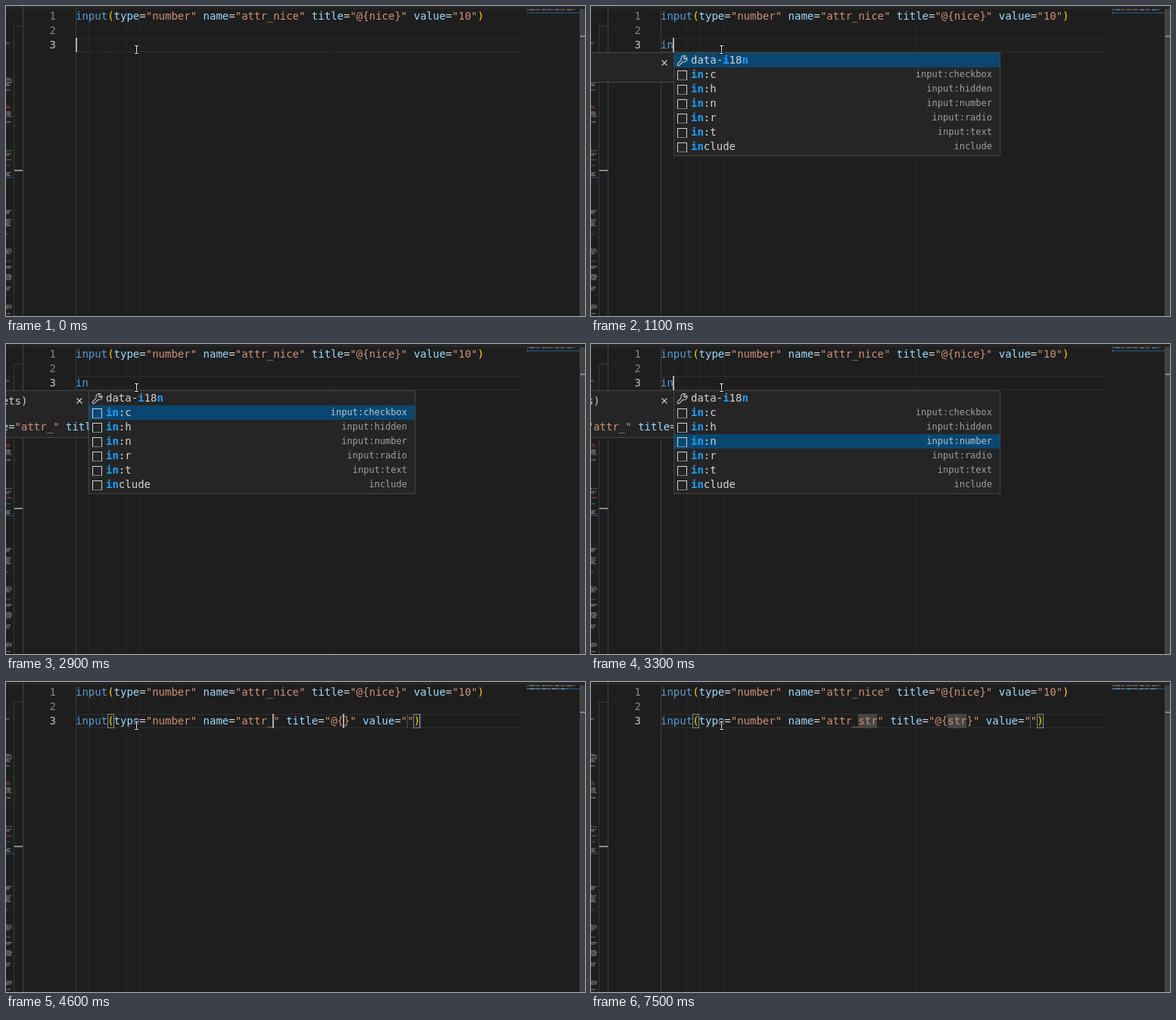
Animation, 765 px wide and 409 px high, one loop 8 s. Source, as an HTML page with a canvas:

```html
<!DOCTYPE html>
<html lang="en">
<head>
<meta charset="utf-8">
<title>Editor completion</title>
<style>
  html, body { margin: 0; width: 100%; height: 100%; overflow: hidden; background: #1e1e1e; }
  canvas { display: block; }
</style>
</head>
<body>
<canvas id="stage" width="765" height="409"></canvas>
<script>
const ctx = document.getElementById('stage').getContext('2d');
const LOOP = 8000, LEFT = 92, ROW = 19, CH = 14 * 0.60205;
const MONO = '"DejaVu Sans Mono", monospace';
const COLOR = {
  bg: '#1e1e1e', text: '#d4d4d4', tag: '#569cd6', attr: '#9cdcfe',
  string: '#ce9178', paren: '#ffd700', match: '#18a3ff',
  panel: '#252526', edge: '#454545', selected: '#094771'
};

const tagLine = (type, name = '', value = '') =>
  `input(type="${type}" name="attr_${name}" title="@{${name}}" value="${value}")`;
const FIRST = tagLine('number', 'nice', '10');

// Timelines: [start, value]
const TYPED = [[0, ''], [500, 'i'], [1100, 'in']];
const NAMES = [[4500, ''], [6000, 's'], [6200, 'st'], [6400, 'str']];
const SELECTED = [[500, 0], [2900, 1], [3100, 2], [3300, 3], [3900, 4],
  [4000, 5], [4100, 6], [4200, 5], [4300, 4], [4400, 3]];
const BLINKS = [200, 500, 900, 1100, 1600, 2100, 2600, 3100, 3600, 4100,
  5000, 5500, 6900, 7000, 7500];
const ACCEPT = 4500, BRACKETS = 4600, NEXT_STOP = 7000;

const ITEMS = [
  ['data-i18n', ''],
  ['in:c', 'input:checkbox'], ['in:h', 'input:hidden'], ['in:n', 'input:number'],
  ['in:r', 'input:radio'], ['in:t', 'input:text'], ['include', 'include']
];
const SHORT_ITEMS = [ITEMS[0], ['if', 'if'], ...ITEMS.slice(1)];

// Rows of the neighbouring overview: y, line count, colour
const OVERVIEW = [
  [48, 1], [95, 2], [100, 3], [110, 1], [132, 2, '#a65a3a'], [139, 4], [152, 1],
  [190, 1], [194, 2], [202, 1, '#a65a3a'], [210, 1, '#3f78a8'], [219, 3],
  [269, 3], [281, 5], [300, 1], [320, 4], [336, 1], [343, 2], [354, 4],
  [370, 3], [394, 3], [405, 1]
];

const at = (line, t) => line.reduce((v, [start, next]) => t >= start ? next : v, line[0][1]);
const colX = col => LEFT + col * CH;

function box(x, y, w, h, color) {
  ctx.fillStyle = color;
  ctx.fillRect(x, y, w, h);
}

function frame(x, y, w, h, color) {
  ctx.strokeStyle = color;
  ctx.lineWidth = 1;
  ctx.strokeRect(x + 0.5, y + 0.5, w - 1, h - 1);
}

function text(str, x, y, color, size = 14, weight = '', align = 'left') {
  ctx.font = `${weight} ${size}px ${MONO}`;
  ctx.textAlign = align;
  ctx.fillStyle = color;
  ctx.fillText(str, x, y);
}

function tokens(str) {
  return [...str.matchAll(/^\w+|[()]|\w+(?==)|=|"[^"]*"/g)].map(m => {
    const s = m[0];
    const color = m.index === 0 ? COLOR.tag : s[0] === '"' ? COLOR.string :
      s === '=' ? COLOR.text : /[()]/.test(s) ? COLOR.paren : COLOR.attr;
    return { s, col: m.index, color };
  });
}

function code(str, x, y) {
  for (const k of tokens(str)) text(k.s, x + k.col * CH, y, k.color);
}

function miniCode(str, y) {
  ctx.globalAlpha = 0.5;
  for (const k of tokens(str)) {
    for (let i = 0; i < k.s.length; i++) {
      if (k.s[i] !== '"') box(688 + k.col + i, y + (i % 3 === 1 ? 0.5 : 0), 1, 1.5, k.color);
    }
  }
  ctx.globalAlpha = 1;
}

function leftOverview() {
  let seed = 7;
  const random = () => (seed = seed * 16807 % 2147483647) / 2147483647;
  for (const [y, count, color = '#9a9a9a'] of OVERVIEW) {
    for (let i = 0; i < count; i++) {
      const end = 3 + random() * 5;
      for (let x = 0; x < end; x++) {
        ctx.globalAlpha = 0.25 + random() * 0.55;
        box(x, y + i * 2, 1, 1.5, color);
      }
    }
  }
  ctx.globalAlpha = 1;
  box(0, 226, 10, 1, '#264f78');
  box(10, 26, 1, 383, '#383838');
  box(10, 26, 12, 1, '#383838');
  box(11, 216, 11, 2, '#8a8a8a');
  box(22, 0, 1, 409, '#444444');
}

function background() {
  box(0, 0, 765, 409, COLOR.bg);
  box(0, 0, 765, 4, COLOR.panel);
  leftOverview();
  for (const col of [2, 4, 6, 8, 10, 40]) box(Math.round(colX(col)), 4, 1, 405, '#262626');
  box(LEFT, 4, 1, 405, '#3c3c3c');
  box(LEFT, 42, 588, 1.5, '#2a2a2a');
  box(LEFT, 59.5, 588, 1.5, '#2a2a2a');
  for (let n = 1; n <= 3; n++) {
    text(n, 66, ROW * n - 1, n === 3 ? '#c6c6c6' : '#858585', 14, '', 'right');
  }
  box(758, 4, 7, 405, '#424242');
  box(758, 4, 1, 405, '#4a4a4a');
  box(759, 39, 6, 2, '#8a8a8a');
  box(688, 8, 70, 2, '#22405f');
}

function wrench(x, y) {
  ctx.strokeStyle = '#c5c5c5';
  ctx.lineWidth = 1.1;
  ctx.lineJoin = 'round';
  ctx.beginPath();
  ctx.moveTo(x + 11.5, y + 1);
  ctx.bezierCurveTo(x + 7, y - 0.5, x + 4.5, y + 3, x + 5.8, y + 6.2);
  ctx.lineTo(x + 1, y + 11);
  ctx.bezierCurveTo(x - 0.2, y + 12.8, x + 1.6, y + 14.4, x + 3.3, y + 13.2);
  ctx.lineTo(x + 8, y + 8.5);
  ctx.bezierCurveTo(x + 12, y + 9.7, x + 14.4, y + 6.5, x + 13.2, y + 3);
  ctx.lineTo(x + 10.6, y + 5.5);
  ctx.lineTo(x + 8.8, y + 3.7);
  ctx.closePath();
  ctx.stroke();
}

function snippetIcon(x, y) {
  const c = '#d0d0d0';
  box(x, y, 13, 1, c);
  box(x, y, 1, 13, c);
  box(x + 12, y, 1, 13, c);
  for (let i = 2; i < 12; i += 2) box(x + i, y + 12, 1, 1, c);
}

function details(item, edge) {
  const [label, detail] = item;
  const height = detail ? 63 : 40;
  box(0, 61, edge + 1, height, COLOR.panel);
  frame(-2, 61, edge + 3, height, COLOR.edge);
  ctx.strokeStyle = '#cccccc';
  ctx.lineWidth = 1.1;
  ctx.beginPath();
  for (const d of [-1, 1]) {
    ctx.moveTo(edge - 15.5, 75 - 3.5 * d);
    ctx.lineTo(edge - 8.5, 75 + 3.5 * d);
  }
  ctx.stroke();
  if (!detail) return;
  ctx.save();
  ctx.beginPath();
  ctx.rect(0, 62, edge, height - 2);
  ctx.clip();
  const x = -5.3 - 25 * CH;
  text(`${detail} (tag snippets)`, x, 80, '#cccccc');
  const type = detail.split(':')[1];
  code(type ? tagLine(type) : 'include', x, 114);
  ctx.restore();
}

function popup(typed, selected) {
  const items = typed.length === 1 ? SHORT_ITEMS : ITEMS;
  const x = Math.round(colX(typed.length)), height = items.length * ROW + 4;
  details(items[selected], x);
  box(x, 61, 432, height, COLOR.panel);
  frame(x, 61, 432, height, COLOR.edge);
  items.forEach(([label, detail], i) => {
    const y = 62 + i * ROW;
    if (i === selected) box(x + 1, y, 430, ROW, COLOR.selected);
    if (i === 0) wrench(x + 4.5, y + 3); else snippetIcon(x + 5, y + 3 + 19 / 19);
    let hit = 0;
    [...label].forEach((c, n) => {
      const match = c === typed[hit];
      if (match) hit++;
      text(c, x + 23 + n * CH, y + 14, match ? COLOR.match : COLOR.text, 14, match ? 'bold' : '');
    });
    text(detail, x + 421, y + 13, i === selected ? '#b3c4d1' : '#a0a0a0', 12, '', 'right');
  });
}

function cursor(col) {
  box(Math.round(colX(col) - (col ? 1 : 0)), 42, 2, ROW, '#aeafad');
}

function snippetLine(t, blinkOn) {
  const name = at(NAMES, t), n = name.length;
  const line = tagLine('number', name);
  const stops = [31, 42 + n], valueCol = 52 + 2 * n, last = line.length - 1;
  for (const col of stops) {
    box(Math.floor(colX(col)), 42, Math.max(1, Math.round(n * CH)), ROW, n ? '#454545' : '#4a4a4a');
  }
  box(Math.floor(colX(valueCol)), 42, 1, ROW, '#4f4f4f');
  box(Math.floor(colX(last + 1)), 42, 1, ROW, '#5a5a5a');
  if (t >= BRACKETS) {
    for (const col of [5, last]) {
      const x = Math.floor(colX(col));
      box(x, 42, 9, ROW, 'rgba(0,100,0,0.1)');
      frame(x, 42, 9, ROW, '#888888');
    }
  }
  code(line, LEFT, 56);
  miniCode(line, 8);
  if (!blinkOn) return;
  if (t >= NEXT_STOP) cursor(valueCol);
  else stops.forEach(col => cursor(col + n));
}

function pointer() {
  const beam = (color, width) => {
    ctx.strokeStyle = color;
    ctx.lineWidth = width;
    ctx.lineCap = 'square';
    ctx.beginPath();
    ctx.moveTo(172.5, 53); ctx.lineTo(172.5, 61);
    for (const y of [52.5, 62.5]) {
      ctx.moveTo(170.5, y); ctx.lineTo(174.5, y);
    }
    ctx.stroke();
    ctx.lineCap = 'butt';
  };
  beam('#101010', 3);
  beam('#f0f0f0', 1);
}

function draw(t) {
  const blinkOn = BLINKS.filter(b => b <= t).length % 2 === 0;
  background();
  code(FIRST, LEFT, 18);
  miniCode(FIRST, 4);
  if (t >= ACCEPT) {
    snippetLine(t, blinkOn);
  } else {
    const typed = at(TYPED, t);
    code(typed, LEFT, 56);
    miniCode(typed, 8);
    if (typed) popup(typed, at(SELECTED, t));
    if (blinkOn) cursor(typed.length);
  }
  pointer();
}

const begin = performance.now();
function tick() {
  draw((performance.now() - begin) % LOOP);
  requestAnimationFrame(tick);
}
tick();
</script>
</body>
</html>
```
